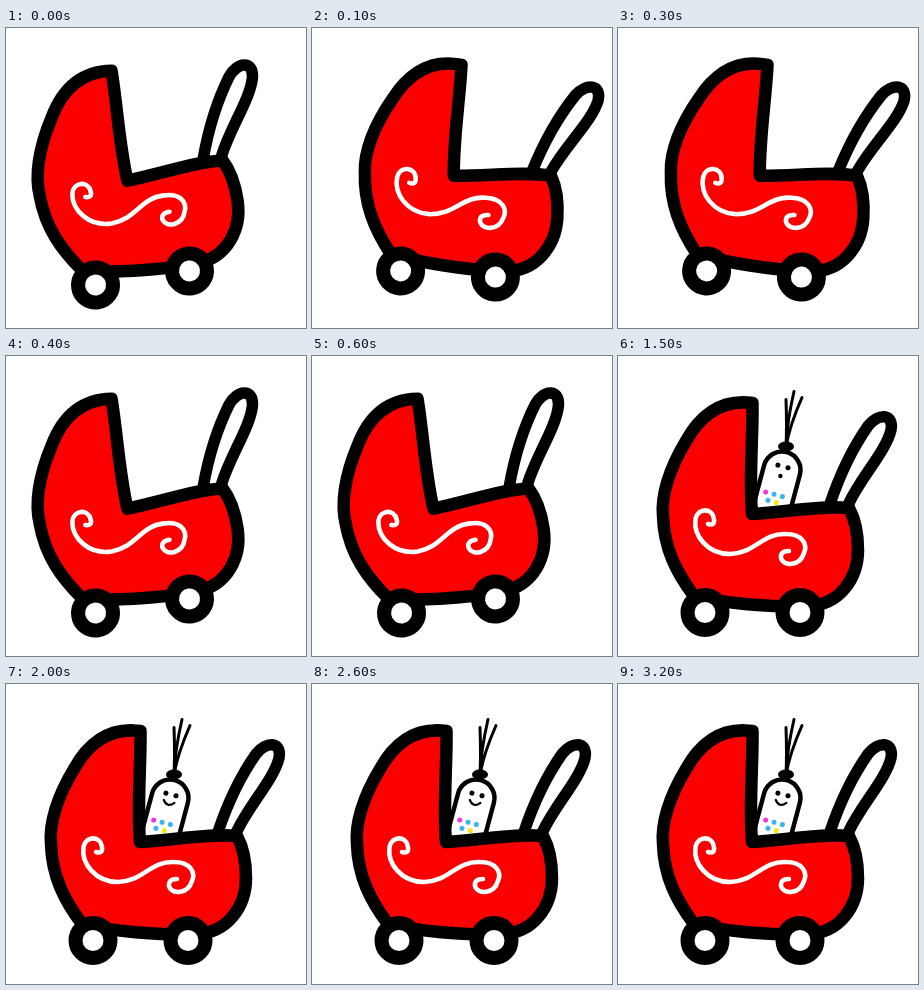
Animation, 300 px wide and 300 px high, one loop 4.2 s. Source, as an HTML page:

```html
<!DOCTYPE html>
<html lang="en">
<head>
<meta charset="utf-8">
<title>Pram</title>
<style>
  html, body { margin: 0; width: 100%; height: 100%; overflow: hidden; background: #fff; }
  svg { display: block; width: 100vw; height: 100vh; }
</style>
</head>
<body>
<svg viewBox="0 0 300 300" fill="none" stroke="#000" stroke-linecap="round" stroke-linejoin="round">
  <g id="baby">
    <g id="body">
      <rect x="-18.5" y="-18.5" width="37" height="75" rx="18.5" fill="#fff" stroke-width="4.5"/>
      <g id="dots" stroke="none"></g>
      <path id="eyes"/>
      <path id="mouth"/>
    </g>
    <g id="hair">
      <path d="M0,0Q1,-20 0,-47M0,0Q1,-25 8,-55M0,0Q4,-22 16,-49" stroke-width="3"/>
      <ellipse rx="8" ry="5" fill="#000" stroke="none"/>
    </g>
  </g>
  <!-- The pram's own zero point lies midway between the wheel hubs. -->
  <g id="pram">
    <g transform="translate(-134.5 -256.5)">
      <path fill="#fff" stroke-width="11.5"
        d="M212,148C222,118 236,90 250,70C260,57 276,57 273,74C268,95 244,120 231,147"/>
      <path fill="#fa0000" stroke-width="12.5"
        d="M134.5,47C104,43 83,58 68,85C51,113 43,140 45,160C46,192 58,216 76,240
           C100,246 150,252 190,250C222,249 240,222 240,194C240,178 237,163 231,152
           C205,149 170,156 134,158C131,125 135,80 134.5,47Z"/>
      <path stroke="#fff" stroke-width="4.6"
        d="M90,168Q97,170 96,163C95,152 80,151 77.5,163C75,180 90,198 112,198
           C138,197 144,177 168,178C184,178 190,188 186,197C182,210 166,211 163,202Q162,195 171,195"/>
    </g>
    <g fill="#fff" stroke-width="14">
      <circle cx="-47.5" r="17.5"/>
      <circle cx="47.5" r="17.5"/>
    </g>
  </g>
</svg>
<script>
const LOOP = 4200, STEP = 100;
const PEEK = 1000, RISE = 200, SMILE = 2000, BLINKS = [1400, 2500, 3100];
const PINK = '#f531e0', BLUE = '#3ab4f0', YELLOW = '#f0e614';

const $ = id => document.getElementById(id);
const set = (id, attrs) => {
  for (const k in attrs) $(id).setAttribute(k, attrs[k]);
};
const place = (id, { x, y, turn }) =>
  set(id, { transform: `translate(${x} ${y}) rotate(${turn})` });
const mix = (a, b, k) => a + (b - a) * k;

const BACK = { x: 136.5, y: 250, turn: -8.5 };
const FRONT = { x: 136, y: 246, turn: 3.7 };
const LEVEL = { x: 134.5, y: 256.5, turn: 0 };

// Two zigzag rows of spots on the tummy
$('dots').innerHTML = [PINK, BLUE, BLUE, YELLOW, BLUE].map((fill, i) =>
  `<circle cx="${i * 4.3 - 10}" cy="${25.5 + (i % 2) * 7.5}" r="2.5" fill="${fill}"/>`).join('');

function drawFace(blink, smile) {
  set('eyes', blink
    ? { d: 'M-7.7,-3.7h5M2.7,-3.7h5', 'stroke-width': 2 }
    : { d: 'M-5.2,-3.7h.01M5.2,-3.7h.01', 'stroke-width': 5 });
  set('mouth', smile
    ? { d: 'M-5.5,3.5q5.5,7 11,0', 'stroke-width': 2.2 }
    : { d: 'M0,6.2h.01', 'stroke-width': 4.4 });
}

function drawBaby(rise) {
  const x = mix(153, 164, rise), y = mix(150, 114, rise);
  place('body', { x, y, turn: 15 * rise });
  place('hair', { x: x + mix(1, 4, rise), y: y - 23.5, turn: 0 });
}

function draw(ms) {
  const step = Math.floor((ms % LOOP) / STEP), t = step * STEP;
  const rocking = t < PEEK;
  place('pram', rocking ? (step % 2 ? FRONT : BACK) : LEVEL);
  $('baby').style.display = rocking ? 'none' : '';
  drawBaby(Math.min(1, Math.max(0, (t - PEEK) / RISE)));
  drawFace(BLINKS.includes(t), t >= SMILE);
}

const start = performance.now();
function tick() {
  draw(performance.now() - start);
  requestAnimationFrame(tick);
}
tick();
</script>
</body>
</html>
```
